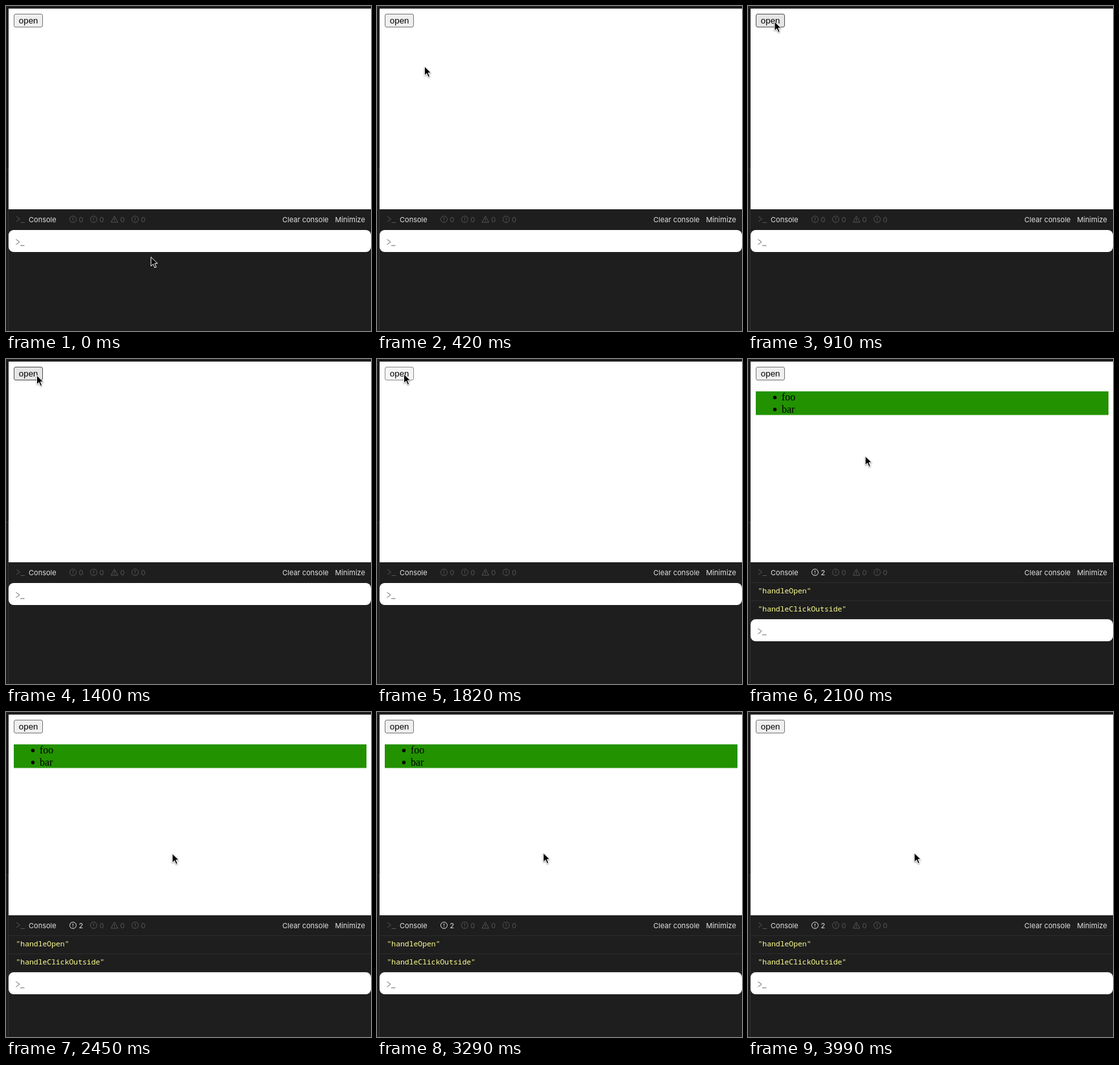
These frames come from a looping animation (564x502 px, 5320 ms). An HTML page:

```html
<!DOCTYPE html>
<html lang="en">
<head>
<meta charset="utf-8">
<title>Click outside</title>
<style>
  html, body { margin: 0; width: 100%; height: 100%; overflow: hidden; background: #1e1e1e; }
  svg { display: block; width: 564px; height: 502px; }
  .ui { font: 11px Inter, sans-serif; fill: #e3e3e3; }
  .log { font: 11.4px "Noto Sans Mono", monospace; fill: #ffff92; }
  .list { font: 16px "Liberation Serif", serif; }
  .line { fill: none; stroke: currentColor; }
  .badge { color: #555; }
  .badge text { fill: currentColor; }
  .badge.on { color: #e3e3e3; }
  #button text { font: 13.33px "Liberation Sans", sans-serif; text-anchor: middle; }
  #cursor { filter: drop-shadow(0 1px 1px #0006); }
</style>
</head>
<body>
<svg viewBox="0 0 564 502">
  <defs>
    <path id="prompt" class="line" d="M0 0l5.5 4-5.5 4M6.500 9.500h6.500"/>
    <g id="alert" class="line">
      <circle r="5"/>
      <path d="M0-2.800v3.300M0 1.800v1.200"/>
    </g>
    <path id="warning" class="line" stroke-linejoin="round" d="M0-5L5.200 4.500H-5.200ZM0-1.800v3M0 2.200v1"/>
  </defs>

  <rect width="564" height="502" fill="#1e1e1e"/>
  <path d="M3.500 250V502M0 252.500H3" stroke="#333"/>
  <rect x="4" y="4" width="560" height="310" fill="#fff"/>

  <g id="button">
    <rect x="12.500" y="12.500" width="44" height="20" rx="2.500"/>
    <text x="34.700" y="27">open</text>
  </g>

  <g id="menu" class="list">
    <rect x="12" y="50" width="545" height="36.500" fill="#229200"/>
    <circle cx="41.500" cy="59.500" r="2.700"/>
    <circle cx="41.500" cy="78" r="2.700"/>
    <text x="52" y="64">foo</text>
    <text x="52" y="82.500">bar</text>
  </g>

  <g class="ui">
    <use href="#prompt" x="16" y="325" color="#555"/>
    <text x="35" y="334">Console</text>
    <g class="badge" id="count"><use href="#alert" x="103.500" y="329.500"/><text x="112.500" y="334">0</text></g>
    <g class="badge"><use href="#alert" x="135.500" y="329.500"/><text x="144.500" y="334">0</text></g>
    <g class="badge"><use href="#warning" x="167.500" y="329.500"/><text x="176.500" y="334">0</text></g>
    <g class="badge"><use href="#alert" x="199.500" y="329.500"/><text x="208.500" y="334">0</text></g>
    <text x="427" y="334">Clear console</text>
    <text x="508.500" y="334">Minimize</text>
  </g>

  <g id="logs" class="log">
    <path d="M4 345.500H564M4 373.500H564M4 401.500H564" stroke="#2c2c2c"/>
    <text x="15.500" y="362">"handleOpen"</text>
    <text x="15.500" y="390">"handleClickOutside"</text>
  </g>

  <g id="input">
    <rect x="4" y="346" width="560" height="34" rx="8" fill="#fff"/>
    <use href="#prompt" x="15.500" y="360.500" color="#666"/>
  </g>

  <path id="cursor" stroke="#fff" d="M.5 1.200V15.300L3.900 12.100 6.300 17.700 8.700 16.700 6.300 11.200H10.700Z"/>
</svg>

<script>
const LOOP = 5320, STEP = 70, PRESS = 1820, OPEN = 1890, CLOSE = 3990;

// Pointer stops: time, x, y
const stops = [
  [0, 223.5, 386.5], [560, 45, 37.5], [700, 40, 22], [840, 40, 22], [910, 40.5, 23],
  [1050, 58.5, 30.5], [1120, 58.5, 30.5], [1260, 46, 24], [1330, 46, 24], [1400, 47, 24],
  [1470, 47, 24], [1680, 41, 22], [PRESS, 41, 22], [OPEN, 41, 23], [2240, 256.5, 217],
  [2310, 256.5, 217], [2380, 256, 216], [2450, 256.5, 217.5], [3220, 256.5, 217.5],
  [3290, 256.5, 216.5], [LOOP, 256.5, 216.5]
];

// Button fill and border
const looks = {
  idle: ["#efefef", "#767676"],
  hover: ["#e5e5e5", "#4f4f4f"],
  active: ["#f5f5f5", "#8d8d8d"]
};

const $ = selector => document.querySelector(selector);
const show = (selector, on) => $(selector).setAttribute("visibility", on ? "visible" : "hidden");
const smooth = p => p * p * (3 - 2 * p);

function pointerAt(t) {
  const i = stops.findIndex(stop => stop[0] > t);
  const [t0, x0, y0] = stops[i - 1], [t1, x1, y1] = stops[i];
  const p = smooth((t - t0) / (t1 - t0));
  return [x0 + (x1 - x0) * p, y0 + (y1 - y0) * p];
}

function draw(t) {
  const [x, y] = pointerAt(t);
  const logged = t >= OPEN;
  const hover = t >= 910 && x < 57 && y < 33;
  const [fill, stroke] = looks[t === PRESS ? "active" : hover ? "hover" : "idle"];

  $("#cursor").setAttribute("transform", `translate(${x} ${y})`);
  $("#button rect").setAttribute("fill", fill);
  $("#button rect").setAttribute("stroke", stroke);
  show("#menu", logged && t < CLOSE);
  show("#logs", logged);
  $("#input").setAttribute("transform", `translate(0 ${logged ? 56 : 0})`);
  $("#count").classList.toggle("on", logged);
  $("#count text").textContent = logged ? 2 : 0;
}

const start = performance.now();
function tick() {
  const t = (performance.now() - start) % LOOP;
  draw(Math.floor(t / STEP) * STEP);
  requestAnimationFrame(tick);
}
tick();
</script>
</body>
</html>
```
